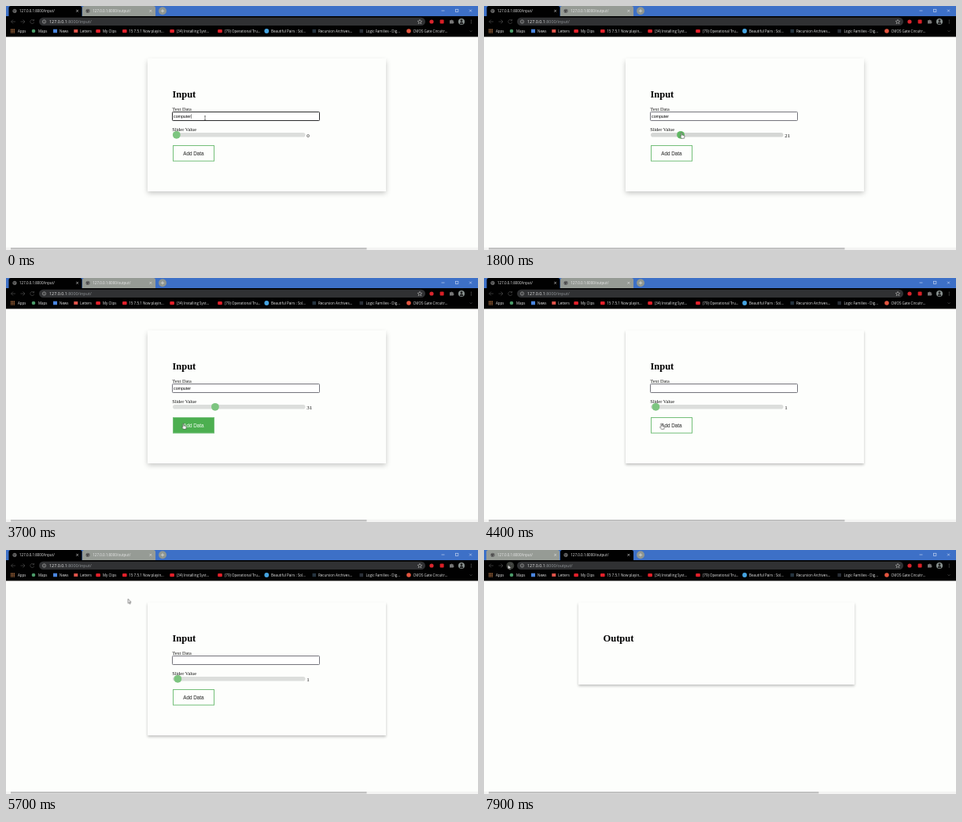
These frames come from a looping animation (600 by 312 pixels, 8000 ms). An HTML page:

```html
<!DOCTYPE html>
<html lang="en">
<head>
<meta charset="utf-8">
<title>Input and output</title>
<style>
  @property --value { syntax: "<integer>"; inherits: true; initial-value: 0; }

  html, body { margin: 0; width: 100%; height: 100%; overflow: hidden; }
  body { position: relative; background: #fdfefc; }
  svg, .page { position: absolute; left: 0; top: 0; width: 600px; height: 312px; }
  svg { overflow: hidden; }

  /* every part shares one 8 s clock */
  .page, .card.hoverable, .ui, .toggle, #cursor, #field, #button, #label, #slider {
    animation: 8s step-end infinite;
  }

  .ui { font: 4.5px "Open Sans", "Noto Sans", sans-serif; fill: #e8e8e8; }
  .serif { font: 6.25px "Liberation Serif", serif; fill: #111; }
  .heading { font: bold 12.5px "Liberation Serif", serif; fill: #000; }
  .sans { font-family: "Liberation Sans", sans-serif; }
  .url { font-size: 5.4px; }
  .line { fill: none; stroke: #bbb; stroke-width: .6; }
  .dim { stroke: #5a5a5a; }

  .card { position: absolute; top: 67px; background: #fdfefc; box-shadow: 0 1.6px 3.2px rgba(0,0,0,.24); }
  .input .card { left: 180px; width: 302.5px; height: 170px; }
  .output .card { left: 120px; width: 350.5px; height: 104.5px; }
  .card.hoverable { animation-name: lift; }
  .value { position: absolute; left: 382.3px; top: 161.6px; font: 7px/8px "Liberation Serif", serif; color: #111; }
  .value::after { counter-reset: v var(--value); content: counter(v); }

  .input { animation-name: first, count; }
  .output, .tab-output { animation-name: second; }
  .tab-input { animation-name: first; }

  #thumb { transform: translateX(calc(var(--value) * 1.584px)); }
  #slider { animation-name: slider; }
  #field { animation-name: focus; }
  #button { animation-name: fill; }
  #label { animation-name: invert; }
  #caret { animation-name: caret; }
  #typed { animation-name: typed; }
  #reload-glow { animation-name: glow; }
  #cursor { animation-name: travel; }
  #arrow { animation-name: arrow; }
  #hand { animation-name: hand; }
  #beam { animation-name: beam; }

  @keyframes first { 0% { visibility: visible; } 77.5%, 100% { visibility: hidden; } }
  @keyframes second { 0% { visibility: hidden; } 77.5%, 100% { visibility: visible; } }
  @keyframes lift {
    0% { box-shadow: 0 3.1px 6.3px rgba(0,0,0,.22); }
    52.5%, 100% { box-shadow: 0 1.6px 3.2px rgba(0,0,0,.24); }
  }
  @keyframes count {
    0% { --value: 0; }
    17.5% { --value: 0; animation-timing-function: steps(6); }
    25% { --value: 31; }
    52.5%, 100% { --value: 1; }
  }
  @keyframes slider {
    0% { opacity: .72; }
    11.25% { opacity: .88; }
    32.5%, 100% { opacity: .72; }
  }
  @keyframes focus {
    0% { stroke: #2a2a2c; }
    18.75%, 100% { stroke: #74747c; }
  }
  @keyframes fill {
    0% { fill: #fdfefc; }
    40% { fill: #fdfefc; animation-timing-function: steps(5); }
    46.25% { fill: #4caf50; }
    52.5%, 100% { fill: #fdfefc; }
  }
  @keyframes invert {
    0% { fill: #222; }
    40% { fill: #222; animation-timing-function: steps(5); }
    46.25% { fill: #f4fff4; }
    52.5%, 100% { fill: #222; }
  }
  @keyframes caret { 0% { opacity: 1; } 6.25%, 100% { opacity: 0; } }
  @keyframes typed { 0% { opacity: 1; } 52.5%, 100% { opacity: 0; } }
  @keyframes glow { 0% { opacity: 0; } 88.75%, 100% { opacity: 1; } }
  @keyframes travel {
    0% { transform: translate(253px, 143px); }
    1.25% { transform: translate(253px, 143px); animation-timing-function: steps(8); }
    11.25% { transform: translate(218.5px, 163px); }
    17.5% { transform: translate(218.5px, 163px); animation-timing-function: steps(6); }
    25% { transform: translate(267.5px, 163px); }
    31.25% { transform: translate(267.5px, 163px); animation-timing-function: steps(3); }
    35% { transform: translate(218.7px, 209.5px); }
    36.25% { transform: translate(218.7px, 209.5px); animation-timing-function: steps(5); }
    42.5% { transform: translate(225.5px, 187px); }
    66.25% { transform: translate(225.5px, 187px); animation-timing-function: steps(6); }
    73.75% { transform: translate(120px, .3px); }
    80% { transform: translate(120px, .3px); animation-timing-function: steps(8); }
    90%, 100% { transform: translate(30.5px, 19px); }
  }
  @keyframes arrow {
    0% { opacity: 0; }
    5% { opacity: 1; }
    11.25% { opacity: 0; }
    32.5% { opacity: 1; }
    40% { opacity: 0; }
    67.5%, 100% { opacity: 1; }
  }
  @keyframes hand {
    0% { opacity: 0; }
    11.25% { opacity: 1; }
    32.5% { opacity: 0; }
    40% { opacity: 1; }
    67.5%, 100% { opacity: 0; }
  }
  @keyframes beam { 0% { opacity: 1; } 5%, 100% { opacity: 0; } }
</style>
</head>
<body>

<div class="page input">
  <div class="card hoverable"></div>
  <svg viewBox="0 0 600 312">
    <text class="heading" x="211.4" y="116.8">Input</text>
    <text class="serif" x="211.3" y="133.6">Text Data</text>
    <rect id="field" x="211.5" y="135.5" width="187" height="11" rx=".8" fill="#fff"/>
    <text id="typed" class="sans toggle" x="213" y="142.8" font-size="5.25">computer</text>
    <path id="caret" class="toggle" d="M235.3 138.3v5.6" stroke="#222" stroke-width=".6"/>
    <text class="serif" x="211.3" y="159.6">Slider Value</text>
    <g id="slider">
      <rect x="212" y="162" width="168.5" height="5.6" rx="2.8" fill="#d0d2d0"/>
      <circle id="thumb" cx="216.8" cy="164.8" r="4.9" fill="#4caf50"/>
    </g>
    <rect id="button" x="212.5" y="178.5" width="52" height="19.7" stroke="#74bf79" stroke-width="1"/>
    <text id="label" class="sans" x="225.2" y="190.6" font-size="6.35">Add Data</text>
    <rect y="308.6" width="600" height="3.4" fill="#f4f4f3"/>
    <rect x="6" y="309" width="452.5" height="2.5" fill="#c1c1c1"/>
  </svg>
  <div class="value"></div>
</div>

<div class="page output">
  <div class="card"></div>
  <svg viewBox="0 0 600 312">
    <text class="heading" x="151.5" y="116.8">Output</text>
    <rect y="308.6" width="600" height="3.4" fill="#f4f4f3"/>
    <rect x="6" y="309" width="419.5" height="2.5" fill="#c1c1c1"/>
  </svg>
</div>

<svg viewBox="0 0 600 312">
  <defs>
    <path id="tab" d="M0 13V2.5Q0 0 2.5 0h88q2.5 0 2.5 2.5V13z"/>
    <g id="globe"><circle r="2.6" fill="#666"/><path d="M-2 -1l2 1 1.5-1.5M-1 2l1-2" stroke="#333" stroke-width=".7" fill="none"/></g>
    <path id="close" d="M-1.4-1.4l2.8 2.8m0-2.8l-2.8 2.8"/>
  </defs>

  <!-- window frame -->
  <rect width="600" height="13" fill="#3d70c7"/>
  <rect y="13" width="600" height="26.4" fill="#010101"/>
  <g class="ui tab-input">
    <use href="#tab" x="97" fill="#969b95"/>
    <use href="#tab" x="3.5" fill="#010101"/>
  </g>
  <g class="ui tab-output">
    <use href="#tab" x="3" fill="#969b95"/>
    <use href="#tab" x="97" fill="#010101"/>
  </g>
  <g class="line" style="stroke:#e4e4e4">
    <use href="#close" x="90.6" y="6.3"/>
    <use href="#close" x="183.8" y="6.3"/>
  </g>
  <use href="#globe" x="11" y="6.3"/>
  <use href="#globe" x="104" y="6.3"/>
  <g class="ui">
    <text x="17" y="8">127.0.0.1:8000/input/</text>
    <text x="110.3" y="8">127.0.0.1:8000/output/</text>
  </g>
  <circle cx="199" cy="6.3" r="5" fill="#8f9690"/>
  <path class="line" style="stroke:#eee" d="M196.8 6.3h4.4M199 4.1v4.4"/>
  <g class="line" style="stroke:#d5e0f5">
    <path d="M553.5 6h4"/><rect x="571.5" y="4.2" width="3.4" height="3.4"/><use href="#close" x="590.5" y="6"/>
  </g>

  <!-- toolbar -->
  <rect x="42" y="14.7" width="491" height="10.4" rx="5.2" fill="#303133"/>
  <circle id="reload-glow" class="toggle" cx="33.3" cy="20" r="5" fill="#3a3d38"/>
  <g class="line">
    <path class="dim" d="M12 20H6.5m2.5-2.5L6.5 20 9 22.5"/>
    <path class="dim" d="M18.5 20H24m-2.5-2.5L24 20l-2.5 2.5"/>
    <path class="dim" d="M35.3 18.5a2.5 2.5 0 1 0 .4 2.2M35.6 16.8v2h-2"/>
    <circle cx="48.5" cy="20" r="2.2"/><path d="M48.5 19.7v1.5M48.5 18.5v.5"/>
    <path d="M526 17.3l.8 1.8 2 .2-1.5 1.3.5 2-1.8-1.1-1.8 1.1.5-2-1.5-1.3 2-.2z"/>
  </g>
  <g class="ui tab-input"><text class="url" x="55" y="22">127.0.0.1<tspan fill="#92969a">:8000/input/</tspan></text></g>
  <g class="ui tab-output"><text class="url" x="55" y="22">127.0.0.1<tspan fill="#92969a">:8000/output/</tspan></text></g>
  <circle cx="541" cy="20" r="2.6" fill="#d9262e"/>
  <rect x="551.6" y="17.5" width="5" height="5" rx="1" fill="#d91f26"/>
  <path d="M564 18.3h1.6a.9.9 0 0 1 1.8 0h1.3v1.6a.9.9 0 0 1 0 1.8v.8H564z" fill="#777"/>
  <circle cx="579" cy="20" r="4" fill="#8b9492"/>
  <path d="M576.8 23.2q0-3 2.2-3t2.2 3zM577.5 18.5a1.5 1.5 0 0 1 3 0 1.5 1.5 0 0 1-3 0" fill="#222"/>
  <path d="M591.3 17.7v4.8" stroke="#777" stroke-width=".9" stroke-dasharray="1 .9"/>

  <!-- bookmarks -->
  <path d="M6 30.2h5M6 32.1h5M6 34h5" stroke-width="1.2" stroke="#d98b52" stroke-dasharray="1.2 .7"/>
  <circle cx="35" cy="32" r="2.3" fill="#4c9b6a"/>
  <rect x="60" y="29.7" width="5" height="4.6" fill="#4a86e0"/>
  <rect x="86.3" y="30" width="5" height="4" fill="#e0534a"/>
  <g fill="#e3202a">
    <rect x="114.3" y="29.9" width="5.6" height="4.3" rx="1"/>
    <rect x="148" y="29.9" width="5.6" height="4.3" rx="1"/>
    <rect x="208.3" y="29.9" width="5.6" height="4.3" rx="1"/>
    <rect x="269.2" y="29.9" width="5.6" height="4.3" rx="1"/>
  </g>
  <circle cx="331.3" cy="32" r="2.9" fill="#45a3e0"/>
  <rect x="389.5" y="29.8" width="4.5" height="4.5" fill="#263440"/>
  <rect x="449.5" y="29.8" width="4.5" height="4.5" fill="#2b3038"/>
  <circle cx="512" cy="32" r="2.8" fill="#e4553f"/>
  <g class="ui">
    <text x="15" y="33.7">Apps</text>
    <text x="41" y="33.7">Maps</text>
    <text x="68" y="33.7">News</text>
    <text x="94.3" y="33.7">Letters</text>
    <text x="123" y="33.7">My Clips</text>
    <text x="156.3" y="33.7">15 7.5.1 Now playin...</text>
    <text x="217" y="33.7">(34) Installing Syst...</text>
    <text x="278" y="33.7">(79) Operational Tru...</text>
    <text x="337" y="33.7">Beautiful Pairs : Sol...</text>
    <text x="397" y="33.7">Recursion Archives...</text>
    <text x="457.5" y="33.7">Logic Families - Dig...</text>
    <text x="517.5" y="33.7">CMOS Gate Circuitr...</text>
  </g>
  <path class="line dim" d="M589.5 31.5l1.5 1.3 1.5-1.3"/>

  <!-- pointer -->
  <g id="cursor">
    <path id="arrow" class="toggle" d="M0 0v5.6l1.3-1.2.9 2 .9-.4-.9-1.9h1.7z" fill="#fff" stroke="#222" stroke-width=".5"/>
    <path id="hand" class="toggle" d="M-.7-.8q.7-.7 1.4 0v2.8l2.5.6q.7.2.6 1.1l-.5 2.6h-3.4L-1.9 3.8q0-.9 1.2 0z" fill="#fff" stroke="#222" stroke-width=".5"/>
    <path id="beam" class="toggle" d="M-1-2.2h2M0-2.2v5M-1 2.8h2" fill="none" stroke="#333" stroke-width=".6"/>
  </g>
</svg>
</body>
</html>
```
